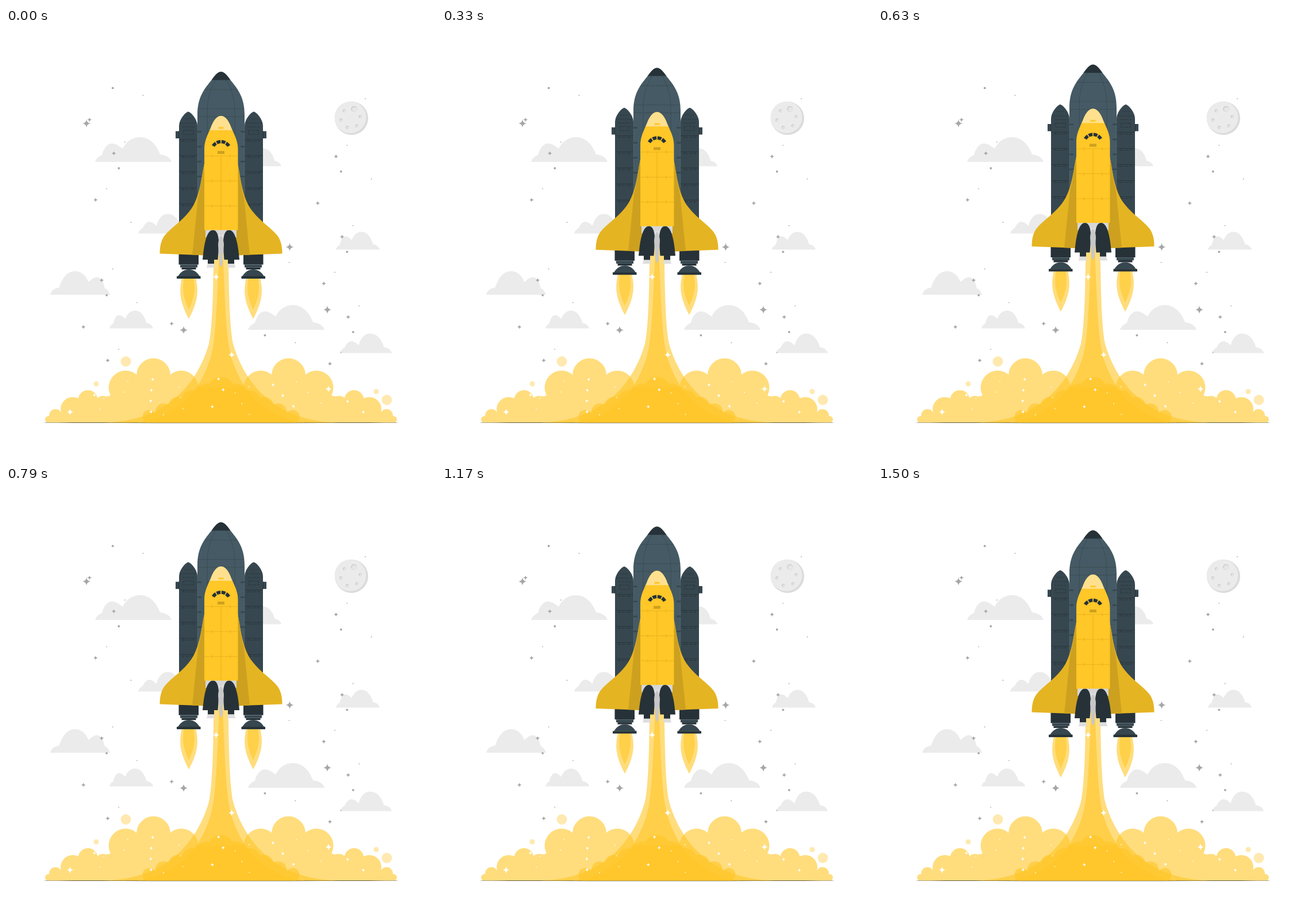
Recreate the animation shown at these times as an HTML page with a canvas. Size 748 by 748 pixels, loop 1.54 s.

```html
<!DOCTYPE html>
<html lang="en">
<head>
<meta charset="utf-8">
<title>Shuttle launch</title>
<style>
html, body { margin: 0; height: 100%; overflow: hidden; background: #fff; }
canvas { display: block; width: 100vw; height: 100vh; }
</style>
</head>
<body>
<canvas id="stage" width="748" height="748"></canvas>
<script>
const SIZE = 748, MID = SIZE / 2, GROUND = 686.5;
const LOOP = 1540, FPS = 24, STEPS = 37;
const ctx = document.getElementById('stage').getContext('2d');
const INK = '#263238', SLATE = '#37474f', STEEL = '#455a64', GREY = '#a6a6a6';
const YELLOW = '#ffc727', AMBER = '#cda11f', HAZE = 'rgba(255,199,39,.6)';

function shape(path, color) {
  ctx.fillStyle = color;
  ctx.fill(new Path2D(path));
}

function line(path, color, width = 0.8, dash = []) {
  ctx.strokeStyle = color;
  ctx.lineWidth = width;
  ctx.setLineDash(dash);
  ctx.stroke(new Path2D(path));
  ctx.setLineDash([]);
}

function box(x, y, w, h, color) {
  ctx.fillStyle = color;
  ctx.fillRect(x, y, w, h);
}

function disc(x, y, r, color) {
  ctx.fillStyle = color;
  ctx.beginPath();
  ctx.arc(x, y, r, 0, 7);
  ctx.fill();
}

function bothSides(draw) {
  draw();
  ctx.save();
  ctx.translate(SIZE, 0);
  ctx.scale(-1, 1);
  draw();
  ctx.restore();
}

function star(x, y, r, color) {
  const k = r * 0.11;
  ctx.fillStyle = color;
  ctx.beginPath();
  ctx.moveTo(x, y - r);
  ctx.quadraticCurveTo(x + k, y - k, x + r, y);
  ctx.quadraticCurveTo(x + k, y + k, x, y + r);
  ctx.quadraticCurveTo(x - k, y + k, x - r, y);
  ctx.quadraticCurveTo(x - k, y - k, x, y - r);
  ctx.fill();
}

// Evenly spread points in the unit square.
function scatter(count, seed, place) {
  for (let i = 1; i <= count; i++) place((seed + i * 0.7549) % 1, (seed + i * 0.5698) % 1);
}

function scatterSky(count, seed, draw) {
  scatter(count, seed, (u, v) => {
    const x = 105 + 540 * u, y = 85 + 500 * v;
    const overShip = Math.abs(x - MID) < (y < 510 ? 112 : 45);
    if (!overShip) draw(x, y);
  });
}

function scatterSmoke(count, seed, draw) {
  scatter(count, seed, (u, v) => {
    const y = 610 + 67 * v;
    draw(MID + (2 * u - 1) * (y - 410), y);
  });
}

function cloud(x, base, w, h, { flip = false, shoulder = 11 } = {}) {
  const side = shoulder + 7, dip = shoulder + 9;
  ctx.save();
  ctx.translate(flip ? x + w : x, base - h);
  ctx.scale((flip ? -w : w) / 133, h / 43);
  shape(`M0 43C2 36 9 32 12 31C15 ${side} 22 ${shoulder} 29 ${shoulder}C37 ${shoulder} 43 ${dip - 4} 48 ${dip}` +
    'C54 7 65 0 78 0C95 0 107 13 113 30C124 31 131 36 133 43Z', '#ebebeb');
  ctx.restore();
}

function moon() {
  disc(601, 157, 29, '#dbdbdb');
  disc(599, 155.5, 27.5, '#ebebeb');
  for (let i = 0; i < 6; i++) {
    const angle = (50 + 60 * i) * Math.PI / 180, r = i === 4 ? 5 : 2.6;
    const x = 599.5 + 17 * Math.cos(angle), y = 157 + 17 * Math.sin(angle);
    disc(x, y, r, '#c7c7c7');
    disc(x + 0.5, y + 0.4, r - 0.7, '#e6e6e6');
  }
}

function drawSky() {
  cloud(155, 233, 133, 43);
  cloud(421, 525, 133, 43);
  cloud(77, 464, 104, 41, { flip: true });
  cloud(180, 522.5, 76, 31);
  cloud(574, 385.5, 76, 31);
  cloud(403, 240.5, 76, 31);
  cloud(581, 565.5, 90, 34, { shoulder: 17 });
  cloud(230, 357.5, 88, 34, { shoulder: 17 });
  moon();
  for (const [x, y] of [[140, 166], [309, 525.5], [493.5, 381], [559, 490]]) star(x, y, 7, GREY);
  scatterSky(22, 0.3, (x, y) => star(x, y, 4, GREY));
  scatterSky(11, 0.62, (x, y) => disc(x, y, 1.9, GREY));
  scatterSky(28, 0.11, (x, y) => disc(x, y, 0.9, GREY));
}

// Joined circles over a floor, filled once so overlaps stay flat.
function smoke(puffs, floor) {
  const path = new Path2D(floor);
  for (const [x, y, r] of puffs) {
    path.moveTo(x + r, y);
    path.arc(x, y, r, 0, 2 * Math.PI);
  }
  ctx.fillStyle = HAZE;
  ctx.fill(path);
}

function outerPuffs() {
  const puffs = [[74, 681, 6], [86, 674, 11], [116, 663, 21], [142.5, 647, 17], [169, 655, 15]];
  for (let i = 0; i < 3; i++) puffs.push([208 + 48.5 * i, 625.5 - 21.5 * (i % 2), 29.5]);
  return puffs;
}

function innerPuffs() {
  const puffs = [];
  for (let i = -5; i <= 5; i++) {
    const n = Math.abs(i), r = 24 - 2.5 * n;
    puffs.push([MID + 25 * i, 607 + 11.5 * n + r, r]);
  }
  return puffs;
}

function looseSmoke() {
  const pale = '#ffe9b0';
  disc(208.5, 580, 9, pale);
  disc(157, 619, 4.5, pale);
  disc(662.5, 647, 9, pale);
  disc(644, 632.5, 4.5, pale);
}

function drawBlast() {
  ctx.fillStyle = INK;
  ctx.beginPath();
  ctx.ellipse(MID, GROUND, 309, 0.7, 0, 0, 7);
  ctx.fill();

  ctx.save();
  ctx.beginPath();
  ctx.rect(0, 0, SIZE, GROUND);
  ctx.clip();
  bothSides(() => smoke(outerPuffs(), 'M74 687V681L90 672L120 650L180 640L208 620L257 600L305 625L374 625V687Z'));
  smoke(innerPuffs(), 'M249 687V674L324 644L374 625L424 644L499 674V687Z');
  ctx.restore();

  shape('M363 378L361 410C360 480 358 525 353 549C335 612 286 684 170 686.5H578' +
    'C462 684 413 612 395 549C390 525 388 480 387 410L385 378Z', HAZE);
  shape('M371 378L370 410C367 480 365 525 360 555C349 612 311 676 228 686.5H520' +
    'C437 676 399 612 388 555C383 525 381 480 378 410L377 378Z', HAZE);
  looseSmoke();

  for (const [x, y] of [[111.5, 668], [365.5, 433], [392.5, 568.5], [561, 628]]) star(x, y, 6, '#fff');
  scatterSmoke(14, 0.45, (x, y) => star(x, y, 3.5, '#fff'));
  scatterSmoke(15, 0.8, (x, y) => disc(x, y, 0.9, '#fff'));
}

function drawTank() {
  const seam = 'rgba(38,50,56,.4)';
  shape('M358 90C346 105 333 119 333 151V352H415V151C415 119 402 105 390 90Z', STEEL);
  line('M345 107H403M334 140.5H414M333 154H415', seam);
  bothSides(() => line('M365 90C355 108 350 122 350 150V230', seam));
  shape('M374 76C369 76 363 82 357.5 90.5H390.5C385 82 379 76 374 76Z', INK);
}

function drawBooster() {
  shape('M318 434H306C301 457 301 474 318 506C335 474 335 457 330 434Z', '#ffdd7d');
  shape('M318 434H310C306 456 308 468 318 490C328 468 330 456 326 434Z', '#ffd049');

  box(295, 179.5, 7, 12.5, SLATE);
  box(300, 179.5, 1.2, 12.5, INK);
  shape('M317 145.5C313 146 301 158 301 171V396H333V171C333 158 321 146 317 145.5Z', SLATE);
  line('M302 165.5H332M310 158H324', INK, 0.7, [3, 1]);
  line('M309 178H326V185H309ZM307 172H328', INK, 0.8, [4, 1.5]);
  for (let y = 194; y < 320; y += 28) {
    line(`M301 ${y}H333M309 ${y}v4M325 ${y}v4`, INK);
    line(`M306 ${y + 3}H329`, INK, 0.8, [3, 3, 6, 2]);
  }
  line('M333.3 168V330', '#5b6d76', 0.7);
  for (let y = 179; y < 260; y += 26) box(333, y, 7, 2.6, SLATE);

  box(300.5, 392, 34.5, 19.5, INK);
  box(303, 411.5, 30, 5, SLATE);
  box(303, 411.5, 30, 0.8, '#607079');
  box(305.5, 416.5, 25, 3.5, INK);
  shape('M299 432C304 424 310 420 318 420C326 420 332 424 337 432Z', SLATE);
  box(297, 431.7, 41.5, 4.3, INK);
}

function drawWing() {
  shape('M345 236C340 256 338 296 319 319C304 338 286 348 276 361C269 370 267.5 382 267.5 392.5L350 395.5V236Z',
    '#e5b422');
  shape('M345 236C341 254 339 278 334 295L324 394.7L350 395.5V236Z', AMBER);
}

function drawTail() {
  box(347, 350, 54, 14, '#d6d6d6');
  box(360, 360, 28, 30, '#e0e0e0');
  bothSides(() => {
    shape('M351 409H361.5L363.5 417H349Z', '#dedede');
    box(351, 402, 11, 8, INK);
    shape('M342 403C344 380 348 351.5 360 351.5C368 351.5 371 364 370 382L368.5 403Z', INK);
  });
  shape('M374 361C371 364 369 370 369 378L371.5 411Q374 419 376.5 411L379 378C379 370 377 364 374 361Z',
    '#c7c7c7');
}

function drawWindows() {
  const degree = Math.PI / 180;
  ctx.strokeStyle = INK;
  ctx.lineWidth = 5.8;
  for (let i = 0; i < 4; i++) {
    const from = -149 + 31 * i;
    ctx.beginPath();
    ctx.arc(MID, 213.5, 15.8, from * degree, (from + 25) * degree);
    ctx.stroke();
  }
}

function drawOrbiter() {
  const seam = 'rgba(190,140,10,.4)';
  const body = 'M374 153C367 153 361 160 356 174C349 189 345 198 345 211V351.5' +
    'H403.5V211C403.5 198 399 189 392 174C387 160 381 153 374 153Z';
  bothSides(drawWing);
  drawTail();
  shape(body, YELLOW);
  ctx.save();
  ctx.clip(new Path2D(body));
  box(345, 150, 59, 27.8, '#ffe08f');
  ctx.restore();
  box(369.5, 172.3, 9, 3, YELLOW);
  for (let y = 222.5; y < 320; y += 43.5) line(`M345 ${y}H403M358 ${y - 3}v6M390 ${y - 3}v6`, seam);
  line('M374 223V351', seam);
  drawWindows();
  box(368, 214, 12, 5, AMBER);
}

// Linear rise, then a linear fall that settles just below the start.
function lift(ms) {
  const top = 718, speed = 0.02;
  return ms < top ? -speed * ms : Math.min(0.9, speed * (ms - 2 * top));
}

function render(now) {
  const step = Math.floor((now % LOOP + 5) * FPS / 1000) % STEPS;
  box(0, 0, SIZE, SIZE, '#fff');
  drawSky();
  drawBlast();
  ctx.save();
  ctx.translate(0, lift(step * 1000 / FPS));
  drawTank();
  bothSides(drawBooster);
  drawOrbiter();
  ctx.restore();
  requestAnimationFrame(() => render(performance.now() - start));
}

const start = performance.now();
render(0);
</script>
</body>
</html>
```
